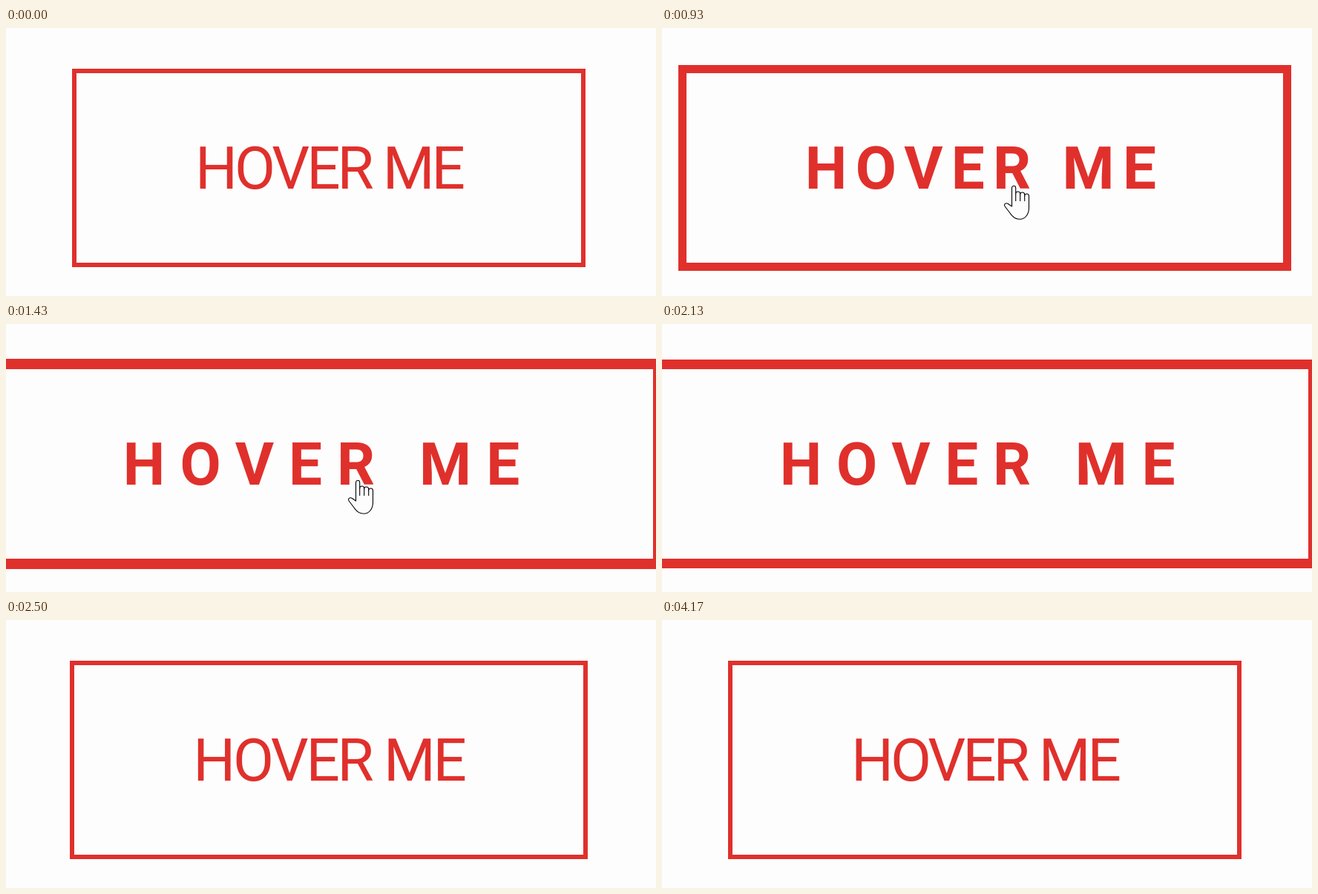
An HTML page for the animation above (4210 ms loop, 876 by 362 pixels).

```html
<!DOCTYPE html>
<html lang="en">
<head>
<meta charset="utf-8">
<title>Hover button</title>
<style>
  html, body { margin: 0; width: 100%; height: 100%; overflow: hidden; background: #fdfdfd; }
  #stage { position: relative; width: 876px; height: 362px; overflow: hidden; }
  #row { position: absolute; left: 0; top: 0; width: 870px; display: flex; justify-content: center; }
  #button {
    flex: none; height: 256px; padding: 0 160px;
    border: 6px solid #e0302c; color: #e0302c;
    font: 400 80px/258px Roboto, sans-serif; white-space: pre;
  }
  #hand { position: absolute; left: 0; top: 0; overflow: visible; }
</style>
</head>
<body>
<div id="stage">
  <div id="row"><div id="button">HOVER ME</div></div>
  <svg id="hand" width="36" height="48" fill="#fdfdfd" stroke="#000" stroke-width="1.1" stroke-linejoin="round" stroke-linecap="round">
    <path d="M10.5 29V4a2.6 2.8 0 0 1 5.2 0V12a3 3 0 0 1 6 0V13a3 3 0 0 1 6 0V15a2.9 3 0 0 1 5.8 0V31C33.5 40 28 46.3 21.5 46.3C14.5 46.3 10.5 42 8 38L1.2 29C-.8 26 2.5 23.5 5.5 25.5Z"/>
    <path fill="none" d="M15.7 12V21.5M21.7 13V21.5M27.7 15V21.5"/>
  </svg>
</div>
<script>
const LOOP = 4210, DURATION = 480, ENTER = 754, LEAVE = 2123;
const button = document.getElementById('button');
const row = document.getElementById('row');
const hand = document.getElementById('hand');

// Pointer path: time, x, y
const path = [
  [660, 446, 370], [720, 452, 312], [770, 456, 254], [830, 459, 227], [930, 461, 212],
  [1100, 461, 210], [1990, 461, 210], [2050, 460, 245], [2100, 458, 335], [2122, 457, 372]
];

const bezier = (a, b, u) => 3 * a * u * (1 - u) ** 2 + 3 * b * u * u * (1 - u) + u ** 3;

// cubic-bezier(.25, .1, .25, 1)
function ease(x) {
  if (x <= 0) return 0;
  if (x >= 1) return 1;
  let lo = 0, hi = 1;
  for (let i = 0; i < 20; i++) {
    const mid = (lo + hi) / 2;
    if (bezier(.25, .25, mid) < x) lo = mid; else hi = mid;
  }
  return bezier(.1, 1, lo);
}

function pointerAt(t) {
  const i = path.findIndex(p => p[0] > t);
  if (i < 1) return [0, 400];
  const [t0, x0, y0] = path[i - 1], [t1, x1, y1] = path[i];
  const k = (t - t0) / (t1 - t0);
  return [x0 + (x1 - x0) * k, y0 + (y1 - y0) * k];
}

function draw(now) {
  const t = now % LOOP;
  const p = ease((t - ENTER) / DURATION) - ease((t - LEAVE) / DURATION);
  const border = Math.floor(6 + 8 * p);
  button.style.letterSpacing = -4 + 24 * p + 'px';
  button.style.fontWeight = p > 1 / 3 ? 700 : 400;
  button.style.borderWidth = border + 'px';
  row.style.top = 61 - border + 'px';
  const [x, y] = pointerAt(t);
  hand.style.transform = `translate(${Math.round(x)}px, ${Math.round(y)}px)`;
}

function tick() {
  draw(performance.now());
  requestAnimationFrame(tick);
}
tick();
</script>
</body>
</html>
```
